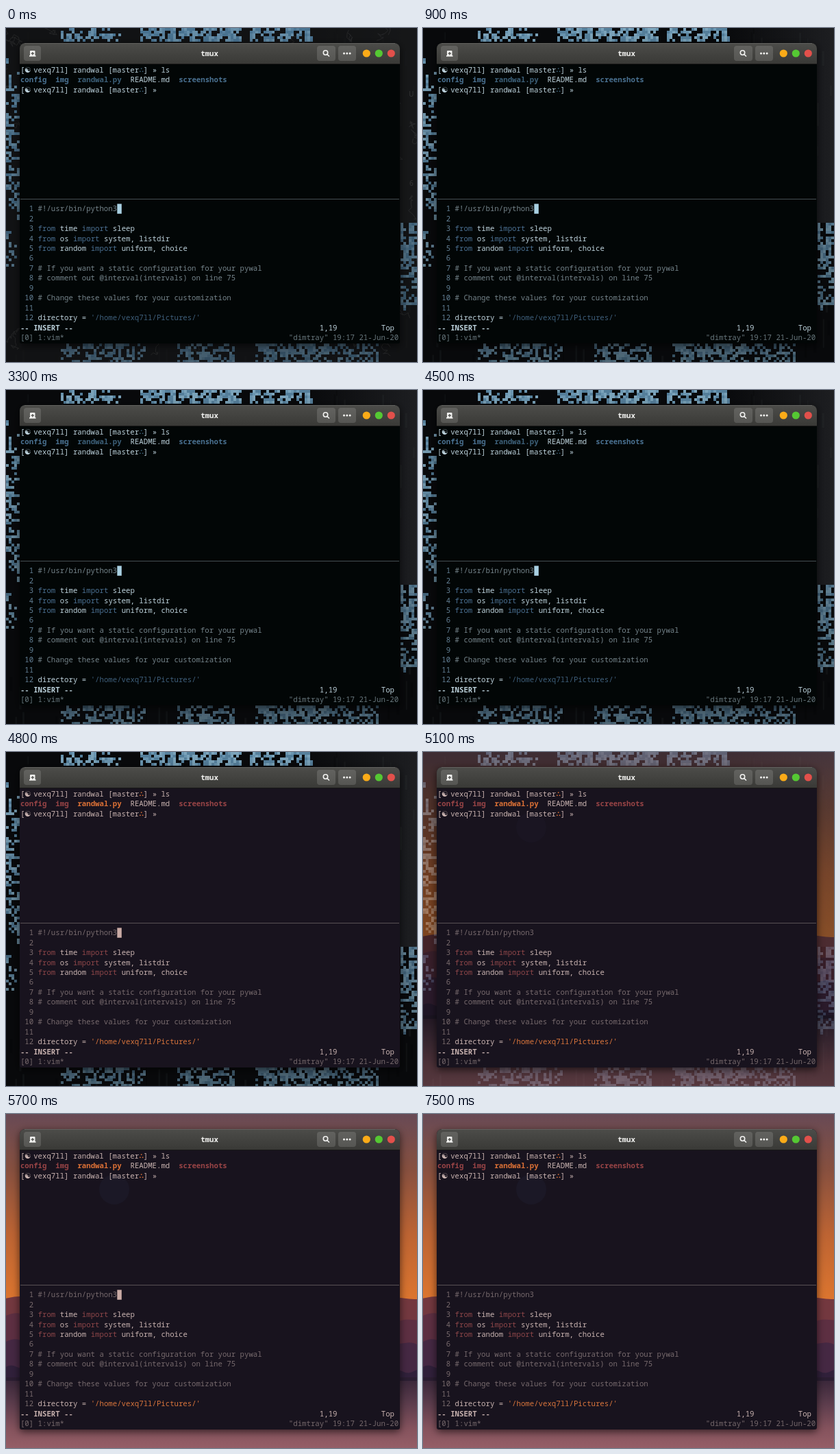
Write an HTML page with a canvas that moves like this. It is 600x487 px and loops after 8 s.

```html
<!DOCTYPE html>
<html lang="en">
<head>
<meta charset="utf-8">
<title>tmux</title>
<style>
html, body { margin: 0; width: 600px; height: 487px; overflow: hidden; background: #0a0b0d; }
canvas { display: block; }
</style>
</head>
<body>
<canvas id="stage" width="600" height="487"></canvas>
<script>
const W = 600, H = 487, LOOP = 8000, SWITCH = 4800;
const CELL_W = 6.425, CELL_H = 14.45, LEFT = 20.9, TOP = 54.1, ASCENT = 10.8;
const MONO = "10.7px 'Noto Sans Mono', monospace";
const ctx = document.getElementById('stage').getContext('2d');

const COOL = {
  bg: '#020606', text: '#bdd2dc', dir: '#4a7191', exec: '#3d6079', keyword: '#4b7092',
  string: '#3f5f7b', comment: '#75848b', number: '#648196', status: '#68777d', line: '#464e52', cursor: '#a9d0e2'
};
const WARM = {
  bg: '#18131e', text: '#c9b3b0', dir: '#984446', exec: '#dc7136', keyword: '#8d4649',
  string: '#d9753c', comment: '#776a6d', number: '#796b6d', status: '#75686b', line: '#585054', cursor: '#c9aaa5'
};

function seeded(seed) {
  return () => (seed = (seed * 16807) % 2147483647) / 2147483647;
}

function paint(draw) {
  const layer = document.createElement('canvas');
  layer.width = W;
  layer.height = H;
  draw(layer.getContext('2d'));
  return layer;
}

function gradient(g, y0, y1, stops) {
  const fill = g.createLinearGradient(0, y0, 0, y1);
  stops.forEach(([at, color]) => fill.addColorStop(at, color));
  return fill;
}

// x, y, width, height, density of the pixel clusters
const CLUSTERS = [
  [80, 0, 88, 20, .45], [196, 0, 148, 20, .68], [356, 0, 92, 20, .58], [0, 28, 20, 56, .12],
  [0, 84, 20, 80, .32], [0, 164, 20, 72, .5], [4, 236, 16, 60, .25], [0, 296, 16, 56, .35],
  [576, 284, 24, 72, .62], [576, 356, 24, 56, .4], [80, 460, 124, 28, .5],
  [250, 460, 84, 28, .45], [364, 460, 96, 28, .6], [460, 460, 84, 28, .45]
];

// Clusters lose light towards the bottom
function clusters(g, colors) {
  const rnd = seeded(71);
  for (const [x0, y0, w, h, density] of CLUSTERS)
    for (let y = y0; y < y0 + h; y += 4)
      for (let x = x0; x < x0 + w; x += 4) {
        const clump = .28 * Math.sin(x * .17 + y * .11) * Math.cos(y * .19 - x * .05);
        const color = colors[Math.floor(rnd() * colors.length)];
        if (rnd() > density + clump) continue;
        g.globalAlpha = 1 - .4 * y / H;
        g.fillStyle = color;
        g.fillRect(x, y, 4, 4);
      }
  g.globalAlpha = 1;
}

const mapWall = paint(g => {
  const rnd = seeded(9);
  g.fillStyle = '#151617';
  g.fillRect(0, 0, W, H);
  g.strokeStyle = '#2c2d2e';
  for (let i = 0; i < 70; i++) {
    let x = rnd() * W, y = rnd() * H;
    g.beginPath();
    g.moveTo(x, y);
    for (let k = 0; k < 12; k++) g.lineTo(x += rnd() * 14 - 7, y += rnd() * 14 - 7);
    g.stroke();
  }
  g.fillStyle = '#3b3c3d';
  g.font = "10px 'Noto Sans', sans-serif";
  g.fillText('U', 588, 100);
  g.fillText('6', 589, 230);
  clusters(g, ['#527996', '#46708f', '#6088a3']);
});

const darkWall = paint(g => {
  const rnd = seeded(33);
  g.fillStyle = '#08090b';
  g.fillRect(0, 0, W, H);
  const fade = g.createLinearGradient(430, 0, W, 0);
  fade.addColorStop(0, '#1b1c1f00');
  fade.addColorStop(1, '#1d1e21');
  g.fillStyle = fade;
  g.fillRect(430, 0, 170, 284);
  for (let i = 0; i < 240; i++) {
    g.fillStyle = rnd() < .5 ? '#00000038' : '#45474a20';
    g.fillRect(rnd() * W, rnd() * H, 1 + rnd() * 3, 8 + rnd() * 40);
  }
  clusters(g, ['#6a95b0', '#557f9b', '#7ba3ba']);
});

const sunsetWall = paint(g => {
  g.fillStyle = gradient(g, 0, 270, [[0, '#684a55'], [.3, '#87503f'], [.65, '#bd6433'], [1, '#dc752f']]);
  g.fillRect(0, 0, W, H);
  const ridge = (base, height, step, color) => {
    g.fillStyle = color;
    g.beginPath();
    g.moveTo(0, H);
    for (let x = 0; x <= W; x += 4)
      g.lineTo(x, base - height * (Math.sin(x * step + 1) + .4 * Math.sin(x * step * 3.7)));
    g.lineTo(W, H);
    g.fill();
  };
  ridge(273, 5, .022, '#73383f');
  ridge(300, 7, .03, '#5d2f42');
  ridge(338, 7, .035, '#452843');
  ridge(372, 4, .06, '#30203a');
  g.fillStyle = gradient(g, 386, H, [[0, '#382639'], [.35, '#5b3c4c'], [.72, '#85535d'], [1, '#955e67']]);
  g.fillRect(0, 388, W, H - 388);
  g.fillStyle = '#2a1d31';
  g.fillRect(0, 384, W, 5);
});

function box(x, y, w, h, radius, fill) {
  ctx.fillStyle = fill;
  ctx.beginPath();
  ctx.roundRect(x, y, w, h, radius);
  ctx.fill();
}

function dot(x, y, r, fill) {
  ctx.fillStyle = fill;
  ctx.beginPath();
  ctx.arc(x, y, r, 0, 7);
  ctx.fill();
}

function put(row, col, text, color, bold) {
  ctx.font = (bold ? 'bold ' : '') + MONO;
  ctx.fillStyle = color;
  ctx.fillText(text, LEFT + col * CELL_W, TOP + row * CELL_H + ASCENT);
}

function prompt(row, c, command) {
  put(row, 0, '[', c.text);
  ctx.font = "11px 'DejaVu Sans', sans-serif";
  ctx.fillText('☯', LEFT + CELL_W - .5, TOP + row * CELL_H + ASCENT);
  put(row, 3, 'vexq7ll] randwal [master', c.text);
  put(row, 27, '∴', c.exec, true);
  put(row, 28, '] » ' + command, c.text);
}

// Each line is a list of [style, text] runs
const CODE = [
  [['comment', '#!/usr/bin/python3']],
  [],
  [['keyword', 'from'], ['text', ' time '], ['keyword', 'import'], ['text', ' sleep']],
  [['keyword', 'from'], ['text', ' os '], ['keyword', 'import'], ['text', ' system, listdir']],
  [['keyword', 'from'], ['text', ' random '], ['keyword', 'import'], ['text', ' uniform, choice']],
  [],
  [['comment', '# If you want a static configuration for your pywal']],
  [['comment', '# comment out @interval(intervals) on line 75']],
  [],
  [['comment', '# Change these values for your customization']],
  [],
  [['text', 'directory = '], ['string', "'/home/vexq7ll/Pictures/'"]]
];

function terminal(c, cursorOn) {
  prompt(0, c, 'ls');
  put(1, 0, 'config', c.dir, true);
  put(1, 8, 'img', c.dir, true);
  put(1, 13, 'randwal.py', c.exec, true);
  put(1, 25, 'README.md', c.text);
  put(1, 36, 'screenshots', c.dir, true);
  prompt(2, c, '');

  ctx.fillStyle = c.line;
  ctx.fillRect(21, 249, 553, 1);

  CODE.forEach((runs, i) => {
    put(14 + i, 0, String(i + 1).padStart(3), c.number);
    let col = 4;
    for (const [style, text] of runs) {
      put(14 + i, col, text, c[style]);
      col += text.length;
    }
  });
  if (cursorOn) {
    ctx.fillStyle = c.cursor;
    ctx.fillRect(162.3, 256.4, 6.5, 14.4);
  }

  put(26, 0, '-- INSERT --', c.text, true);
  put(26, 68, '1,19', c.text);
  put(26, 82, 'Top', c.text);
  put(27, 0, '[0] 1:vim*', c.status);
  put(27, 61, '"dimtray" 19:17 21-Jun-20', c.status);
}

function header() {
  box(20, 22, 555, 31, [8, 8, 0, 0], gradient(ctx, 22, 53, [[0, '#4c4c49'], [1, '#393936']]));
  ctx.fillStyle = '#62625f';
  ctx.fillRect(27, 22, 541, 1);
  ctx.fillStyle = '#181817';
  ctx.fillRect(20, 52, 555, 1);
  for (const [x, w] of [[26, 25], [454, 27], [485, 26]])
    box(x, 26, w, 22, 4, gradient(ctx, 26, 48, [[0, '#62625f'], [1, '#565653']]));

  // New tab icon
  box(35, 33, 7.5, 8, 1, '#f2f2f0');
  ctx.fillRect(34, 40, 9.5, 1.6);
  ctx.fillStyle = '#555552';
  ctx.fillRect(38.1, 35, 1.4, 4.4);
  ctx.fillRect(36.6, 36.5, 4.4, 1.4);

  ctx.strokeStyle = '#f2f2f0';
  ctx.lineWidth = 1.6;
  ctx.beginPath();
  ctx.arc(466.5, 36, 3.2, 0, 7);
  ctx.moveTo(469, 38.5);
  ctx.lineTo(472, 41.5);
  ctx.stroke();
  for (const x of [493.5, 497.8, 502.1]) dot(x, 37, 1.5, '#f2f2f0');

  ctx.font = 'bold ' + MONO;
  ctx.fillStyle = '#f0f0ee';
  ctx.fillText('tmux', 284.2, 41);
  dot(526.3, 37, 5.6, '#fbab18');
  dot(544.3, 37, 5.6, '#55c833');
  dot(562.3, 37, 5.6, '#e2504b');
}

function wallpaper(layer, alpha) {
  ctx.globalAlpha = alpha;
  ctx.drawImage(layer, 0, 0);
  ctx.globalAlpha = 1;
}

const easeOut = x => 1 - (1 - x) ** 2;
const clamp = x => Math.min(1, Math.max(0, x));

function render(t) {
  const step = Math.floor(t / 100) * 100;
  const toDark = easeOut(clamp((step + 100) / 800));
  const toSunset = easeOut(clamp((step - SWITCH) / 900));
  const theme = t < SWITCH ? COOL : WARM;

  wallpaper(mapWall, 1);
  wallpaper(darkWall, toDark);
  wallpaper(sunsetWall, toSunset);

  ctx.save();
  ctx.shadowColor = '#000000a0';
  ctx.shadowBlur = 12;
  ctx.shadowOffsetY = 3;
  box(20, 22, 555, 438, [8, 8, 3, 3], theme.bg);
  ctx.restore();
  ctx.globalAlpha = toSunset;
  dot(158, 110, 22, '#1b1826');
  ctx.globalAlpha = 1;

  header();
  terminal(theme, (t + 300) % 1200 < 600);
}

function tick() {
  render(performance.now() % LOOP);
  requestAnimationFrame(tick);
}
tick();
</script>
</body>
</html>
```
